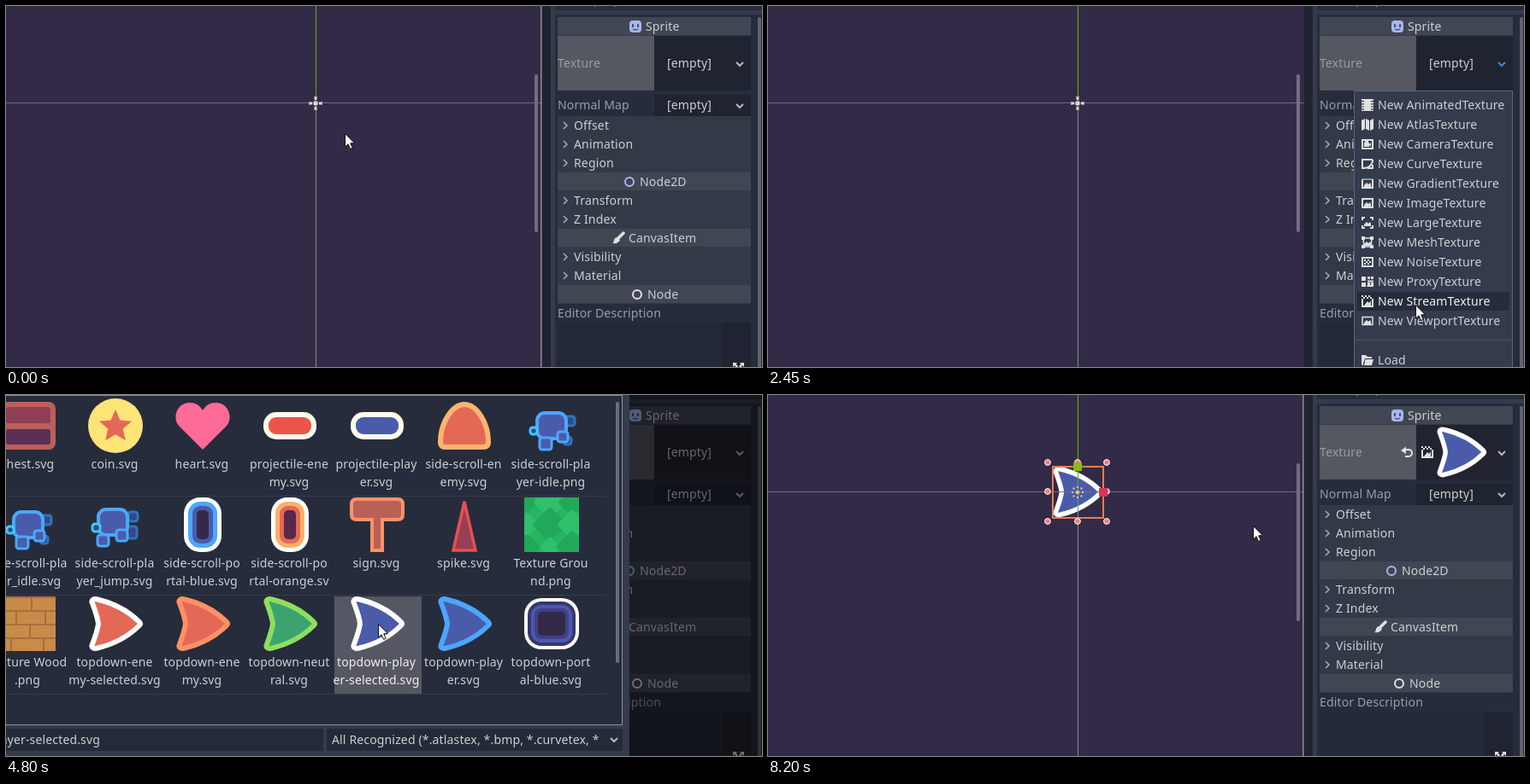
Recreate the animation shown at these times as an HTML page. Size 884x423 px, loop 8500 ms.

```html
<!DOCTYPE html>
<html>
<head>
<meta charset="utf-8">
<title>Assigning a sprite texture</title>
<style>
html, body { margin: 0; width: 100%; height: 100%; overflow: hidden; background: #332a47; }
svg { display: block; }
text { font: 14px "Noto Sans", sans-serif; letter-spacing: .15px; white-space: pre; }
</style>
</head>
<body>
<svg id="stage" width="884" height="423" viewBox="0 0 884 423"></svg>
<script>
const LOOP = 8500;
const C = {
  base: '#333b4d', dark: '#262c3b', darker: '#202430', head: '#414653', sub: '#333947',
  text: '#cdcfd2', dim: '#9a9da6', icon: '#e0e0e0', blue: '#4a5baa', sky: '#4ca6ff', red: '#e36956'
};

const rect = (x, y, w, h, fill, more = '') =>
  `<rect x="${x}" y="${y}" width="${w}" height="${h}" fill="${fill}" ${more}/>`;
const label = (x, cy, str, fill = C.text, more = '') =>
  `<text x="${x}" y="${cy + 5}" fill="${fill}" ${more}>${str}</text>`;
const fillPath = (d, fill, more = '') => `<path d="${d}" fill="${fill}" ${more}/>`;
const line = (d, stroke, w = 1, more = '') =>
  `<path d="${d}" fill="none" stroke="${stroke}" stroke-width="${w}" ${more}/>`;
const ring = (x, y, r, stroke, w = 2) =>
  `<circle cx="${x}" cy="${y}" r="${r}" fill="none" stroke="${stroke}" stroke-width="${w}"/>`;
const group = (x, y, body, s = 1) => `<g transform="translate(${x} ${y}) scale(${s})">${body}</g>`;
const layer = (id, body) => `<g id="${id}">${body}</g>`;
const chevron = (x, y, id = '') => line(`M${x - 4} ${y - 2}l4 4l4-4`, '#b5b8be', 2, id && `id="${id}"`);

const SHIP = 'M5 8C3 4 7 2 11 3.5C30 8 48 18 60 30Q62 32 60 34C48 46 30 56 11 60.5' +
  'C7 62 3 60 5 56C8 48 11 40 12 32C11 24 8 16 5 8Z';
const ship = (fill, stroke) =>
  fillPath(SHIP, fill, `stroke="${stroke}" stroke-width="6" stroke-linejoin="round"`);
const whiteShip = ship(C.blue, '#fff');

// 16 px menu icons
const frame = line('M2 3H14V13H2Z', C.icon, 2);
const hill = fillPath('M4 12V10L7 7L9 9L11 7L12 9V12Z', C.icon);
const dots = (list, s = 2) => list.map(([x, y]) => rect(x, y, s, s, C.icon)).join('');
const streamIcon = dots([[1, 1], [5, 1], [9, 1], [3, 3], [7, 3], [1, 5], [13, 5], [11, 3]]) +
  line('M14 6V14H2V7', C.icon, 2) + fillPath('M4 13L8 8L10 10L12 7V13Z', C.icon);
const ICONS = [
  rect(4, 1, 8, 14, C.icon) + line('M2.5 1V15M13.5 1V15', C.icon, 3, 'stroke-dasharray="2 1.2"'),
  fillPath('M1 3L5 1V13L1 15ZM6 1L10 3V15L6 13ZM11 3L15 1V13L11 15Z', C.icon),
  frame + rect(4, 6, 6, 5, C.icon) + fillPath('M10 8L12 6V11L10 9ZM5 4H9V6H5Z', C.icon),
  line('M14 3H2V13H4M14 3V6', C.icon, 2) + line('M3 13Q12 13 14 5M8 13H14V9', C.icon, 2),
  line('M2 3H14', '#8d9099', 2) + line('M2 3V13H14V3', C.icon, 2) + hill,
  frame + hill,
  line('M2 5V2H5M11 2H14V5M14 11V14H11M5 14H2V11', C.icon, 2) + hill,
  line('M3 3H13L12 13H4Z', C.icon, 1.6) + dots([[1, 1], [11, 1], [1, 11], [11, 11]], 4) + hill,
  frame + dots([[4, 5], [8, 5], [6, 7], [10, 7], [4, 9], [8, 9]]),
  dots([[1, 2], [1, 9]], 5) + dots([[8, 2], [12, 2], [8, 9], [12, 9]], 3) + line('M8 7.5H15M7.5 13H15', C.icon, 2),
  streamIcon,
  line('M2 3.5H14V12.5H2Z', C.icon, 1.5, 'stroke-linejoin="round"') + hill,
];
const folder = fillPath('M1 2H6L8 4H13V6H5L3 12V14H2L1 13ZM5.500 7H15L13 14H4Z', C.icon);

// ---- 2D viewport ----
function viewport() {
  const spots = [[327, 79], [362, 79], [396, 79], [327, 113], [396, 113], [327, 148], [362, 148], [396, 148]];
  const handles = spots.map(([x, y]) =>
    `<circle cx="${x}" cy="${y}" r="3.400" fill="#f37b78" stroke="#fff" stroke-width="1"/>`).join('');
  const pivot = [0, 90, 180, 270].map(a =>
    `<g transform="rotate(${a})">${rect(4, -1.500, 3, 3, '#e3d6d2')}${rect(7, -2, 1, 4, '#b9a9a9')}</g>`).join('') +
    '<circle r="3" fill="#e3d6d2" stroke="#7d7080"/>';
  const smallPivot = [0, 90, 180, 270].map(a =>
    `<g transform="rotate(${a})">${rect(5, -1, 2, 2, '#e3cfa0')}${rect(3.500, 3.500, 2, 2, '#e3cfa0')}</g>`).join('') +
    '<circle r="2.500" fill="#e3cfa0" stroke="#7d7080"/>';
  return rect(0, 0, 627, 423, '#332a47') +
    layer('sprite', group(332.2, 83.8, whiteShip, .93)) +
    rect(0, 113, 627, 1, '#726a82') +
    rect(362, 0, 1, 113, '#74ac10') + rect(362, 113, 1, 310, '#71997a') +
    layer('cross', group(362, 114, pivot)) +
    layer('selection', line('M333 84H392V144H333Z', '#e57e4e', 2) + group(362, 114, smallPivot) + handles) +
    layer('gizmo', rect(357, 79, 10, 10, '#80c00e', 'rx="1"') + rect(387, 109, 10, 10, '#dd3355', 'rx="1"')) +
    rect(618, 80, 4, 185, '#736c83', 'rx="2"') +
    rect(627, 0, 10, 423, C.darker) + rect(625, 0, 1.500, 423, '#878c9b', 'id="focus"');
}

// ---- inspector dock ----
function inspector() {
  const header = (cy, x, name, icon) => rect(645, cy - 11, 226, 21.500, C.head) + icon + label(x, cy, name);
  const fold = (cy, name) => rect(645, cy - 11, 226, 22, C.sub) +
    line(`M652 ${cy - 4}l4 4l-4 4`, '#a5a8af', 1.600) + label(664, cy, name);
  const face = rect(729, 17, 14, 14, '#a5b7f3', 'rx="4"') + rect(732, 21, 2, 4, C.head, 'rx="1"') +
    rect(738, 21, 2, 4, C.head, 'rx="1"') + line('M733 27Q736 29 739 27', C.head, 1.300);
  const brush = line('M716 272L722 266', C.icon, 3.500, 'stroke-linecap="round"') +
    fillPath('M715 271L718 274Q716 279 709 278Q711 277 711 274Q712 271 715 271Z', C.icon);
  return rect(637, 0, 247, 423, C.base) + rect(642, 0, 242, 5, C.dark) + label(649, -8, 'Filter properties', C.dim) +
    rect(642, 10, 242, 413, C.dark) +
    header(24, 748, 'Sprite', face) +
    rect(645, 35, 113, 64, '#555761') + rect(758, 35, 113, 64, C.darker) + label(645, 67, 'Texture', C.dim) +
    layer('empty', label(773, 67, '[empty]', C.text, 'id="emptyText"')) + chevron(858, 68, 'id' && 'arrow') +
    layer('filled', line('M744 64H749A4 4 0 0 1 749 72H745', C.icon, 2) + fillPath('M740 65L746 60.500V69Z', C.icon) +
      group(763, 59, streamIcon) + group(781.2, 37.5, whiteShip, .92)) +
    layer('button', line('M845.500 35.500H870.500V98.500H845.500Z', '#5b8ed8')) +
    label(645, 116, 'Normal Map', C.dim) + rect(758, 104, 113, 25, C.darker) + label(773, 116, '[empty]') + chevron(858, 117) +
    fold(140, 'Offset') + fold(162, 'Animation') + fold(184, 'Region') +
    header(206, 741, 'Node2D', ring(729, 206, 5, '#a5b7f3')) +
    fold(228, 'Transform') + fold(250, 'Z Index') +
    header(272, 728, 'CanvasItem', brush) +
    fold(294, 'Visibility') + fold(316, 'Material') +
    header(338, 750, 'Node', ring(738, 338, 5, C.icon)) +
    label(645, 360, 'Editor Description', C.dim) +
    rect(645, 371, 193, 52, '#242938') + rect(838, 371, 33, 52, C.darker) +
    fillPath('M850 418H855L853.500 419.500L856 422L854 424L852 421L850 423ZM863 418H858L859.500 419.500L857 422L859 424L861 421L863 423Z', C.icon) +
    rect(879, 13, 4, 420, '#5f6472', 'rx="2"');
}

// ---- resource menu ----
const KINDS = ['Animated', 'Atlas', 'Camera', 'Curve', 'Gradient', 'Image', 'Large', 'Mesh', 'Noise', 'Proxy', 'Stream', 'Viewport'];
const rowY = i => 116 + 23 * i;

function menu() {
  const items = KINDS.map((k, i) =>
    group(693, rowY(i) - 8, ICONS[i]) + label(713, rowY(i), `New ${k}Texture`, C.text, `class="item" data-row="${i}"`)).join('');
  return rect(685.5, 99.5, 185, 330, C.base, 'stroke="#5a6478"') +
    rect(689, 0, 178, 22, C.dark, 'id="hover"') + items +
    rect(686, 391, 184, 1, '#4d5567') + group(693, 407, folder) +
    label(713, 415, 'Load', C.text, 'class="item" data-row="13"');
}

// ---- file dialog ----
const block = (x, y, w, h, r, fill, stroke, sw = 4) =>
  rect(x, y, w, h, fill, `rx="${r}" stroke="${stroke}" stroke-width="${sw}"`);
const limb = (x, y, s, c = C.sky) => block(x, y, s, s, 3, c === C.sky ? C.blue : '#34488a', c, 3);

function star(cx, cy, r) {
  let d = '';
  for (let i = 0; i < 10; i++) {
    const a = Math.PI * (i / 5 - .5), q = i % 2 ? r * .46 : r;
    d += `${i ? 'L' : 'M'}${(cx + q * Math.cos(a)).toFixed(1)} ${(cy + q * Math.sin(a)).toFixed(1)}`;
  }
  return fillPath(d + 'Z', C.red);
}
const nested = (w, h, r, step, colors) => colors.map((c, i) => {
  const k = i * step;
  return rect(32 - w / 2 + k, 32 - h / 2 + k, w - 2 * k, h - 2 * k, c, `rx="${Math.max(r - k, 5)}"`);
}).join('');
const capsule = fill => rect(1, 16, 62, 32, '#fffbe9', 'rx="15"') + rect(7, 22, 50, 20, fill, 'rx="9"');
const hero = limb(48, 21, 11, '#2f74b8') + limb(46, 45, 9, '#2f74b8') +
  block(15, 17, 34, 30, 9, C.blue, C.sky) + limb(7, 34, 8, '#3fc8ff') + limb(18, 46, 14) + limb(39, 39, 12);
const jumper = limb(47, 17, 11, '#2f74b8') + limb(43, 34, 14, '#2f74b8') +
  block(12, 14, 34, 30, 9, C.blue, C.sky) + limb(5, 31, 9, '#3fc8ff') + limb(11, 44, 13) + limb(33, 38, 13);

function ground() {
  let s = rect(0, 0, 64, 64, '#27b562');
  for (let i = 0; i < 9; i++) {
    const x = (i % 3) * 26 + 4, y = Math.floor(i / 3) * 26 + 6, r = 9 + (i * 5) % 7;
    s += rect(x - r, y - r, 2 * r, 2 * r, i % 2 ? '#2fc06c' : '#22a85a', `rx="3" transform="rotate(45 ${x} ${y})"`);
  }
  return `<svg width="64" height="64">${s}</svg>`;
}
const wood = rect(0, 0, 64, 64, '#c88b4a') +
  line('M0 1H64M0 17H64M0 33H64M0 49H64M36 1V17M18 17V33M52 17V33M34 33V49M12 49V64M50 49V64', '#a86f3a', 2);
const chest = rect(0, 4, 64, 56, '#bb6059', 'rx="8"') + rect(6, 10, 52, 20, '#8e3f56', 'rx="4"') +
  rect(6, 36, 52, 18, '#5c2f57', 'rx="3"') + rect(0, 29, 64, 5, '#bb6059');
const blob = fillPath('M4 51C4 28 18 7 32 7S60 28 60 51Q60 57 54 57H10Q4 57 4 51Z', C.red, 'stroke="#ffb570" stroke-width="6"');
const heart = fillPath('M32 60L4 32C-4 22 2 5 17 5Q27 5 32 14Q37 5 47 5C62 5 68 22 60 32Z', '#ff6b97');
const sign = fillPath('M8 2H56Q62 2 62 8V20Q62 26 56 26H38V62H26V26H8Q2 26 2 20V8Q2 2 8 2Z', '#ba6156', 'stroke="#ff9166" stroke-width="4"');
const spike = fillPath('M32 5L45 62H19Z', '#963f55', 'stroke="#e84f50" stroke-width="3.500"');
const coin = '<circle cx="32" cy="32" r="32" fill="#ffe478"/>' + star(32, 33, 20);

const FILES = [
  [[chest, 'chest.svg'], [coin, 'coin.svg'], [heart, 'heart.svg'], [capsule('#ec544b'), 'projectile-ene', 'my.svg'],
    [capsule(C.blue), 'projectile-play', 'er.svg'], [blob, 'side-scroll-en', 'emy.svg'], [hero, 'side-scroll-pla', 'yer-idle.png']],
  [[hero, 'side-scroll-pla', 'yer_idle.svg'], [jumper, 'side-scroll-pla', 'yer_jump.svg'],
    [nested(44, 64, 19, 5, ['#fff', C.sky, C.blue, '#332a48']), 'side-scroll-po', 'rtal-blue.svg'],
    [nested(44, 64, 19, 5, ['#fff', '#ffb06a', C.red, '#57294b']), 'side-scroll-po', 'rtal-orange.sv'],
    [sign, 'sign.svg'], [spike, 'spike.svg'], [ground(), 'Texture Grou', 'nd.png']],
  [[wood, 'Texture Wood', '.png'], [ship(C.red, '#fff'), 'topdown-ene', 'my-selected.svg'],
    [ship(C.red, '#ff9166'), 'topdown-ene', 'my.svg'], [ship('#3ca370', '#8fde5d'), 'topdown-neut', 'ral.svg'],
    [whiteShip, 'topdown-play', 'er-selected.svg'], [ship(C.blue, C.sky), 'topdown-play', 'er.svg'],
    [nested(64, 60, 20, 4, ['#fff', '#39366e', C.blue, '#453f86', '#332a48']), 'topdown-port', 'al-blue.svg']],
];

function dialog() {
  let s = rect(728, 0, 156, 423, '#000', 'opacity=".5"') + rect(0, 0, 729, 423, C.base) +
    rect(-2, .5, 722.5, 386, C.dark, 'stroke="#8b909b"') +
    rect(713, 8, 4, 306, '#686d7b', 'rx="2"') + rect(384, 236, 102, 115, '#555863');
  for (const y of [118, 234, 350]) s += rect(0, y, 701, 1, '#353b4a');
  FILES.forEach((row, r) => row.forEach(([icon, ...names], c) => {
    const x = 26 + 102 * c, y = 4 + 116 * r;
    s += group(x - 32, y, icon);
    names.forEach((n, i) => {
      s += label(x - 1, y + 77 + 21 * i, n, r === 2 && c === 4 ? '#f0f0f0' : C.text, 'text-anchor="middle"');
    });
  }));
  return s + rect(0, 391, 371, 26, '#252a38') + label(110, 404, 'topdown-player-selected.svg', C.text, 'text-anchor="end"') +
    rect(375, 391, 346, 26, '#252a38') + label(381, 404, 'All Recognized (*.atlastex, *.bmp, *.curvetex, *') + chevron(711, 404);
}

const cursor = fillPath('M.5 .5V16L4 12.800L6.600 18.500L9.200 17.300L6.700 11.800H11.500Z', '#fff', 'stroke="#111" stroke-width="1"');

document.getElementById('stage').innerHTML =
  viewport() + inspector() + layer('menu', menu()) + layer('dialog', dialog()) + layer('cursor', cursor);

// ---- motion ----
const linear = p => p;
const smooth = p => p * p * (3 - 2 * p);
const out = p => 1 - (1 - p) ** 2;
const START = [396, 149];
// first step, last step, number of steps, end point, easing
const MOVES = [
  [200, 1050, 18, 797, 74, smooth],
  [1100, 1200, 3, 851, 69, out],
  [1450, 1450, 1, 859, 71, linear],
  [1850, 2000, 4, 800, 186, linear],
  [2050, 2050, 1, 795, 204, linear],
  [2100, 2450, 8, 757, 350, out],
  [2550, 2750, 3, 737, 399, linear],
  [2950, 3050, 2, 733, 408, linear],
  [4000, 4450, 6, 452, 279, smooth],
  [4600, 4800, 3, 435, 268, linear],
  [6200, 6850, 14, 567, 153, smooth],
];

function tip(t) {
  let [x, y] = START;
  for (const [a, b, n, ex, ey, ease] of MOVES) {
    if (t < a) break;
    const gap = n > 1 ? (b - a) / (n - 1) : 1;
    const p = ease(Math.min(1, (Math.floor((t - a) / gap + 1e-6) + 1) / n));
    x += (ex - x) * p;
    y += (ey - y) * p;
  }
  return [Math.round(x), Math.round(y)];
}

const el = id => document.getElementById(id);
const items = document.querySelectorAll('.item');
const show = (id, on) => el(id).setAttribute('display', on ? 'inline' : 'none');

function draw(t) {
  const [x, y] = tip(t);
  const menuOpen = t >= 1600 && t < 3500, done = t >= 5350;
  el('cursor').setAttribute('transform', `translate(${x} ${y})`);
  show('menu', menuOpen);
  show('dialog', t >= 3500 && !done);
  for (const id of ['sprite', 'selection', 'filled']) show(id, done);
  show('cross', !done);
  show('empty', !done);
  show('button', done && t < 6200);
  show('focus', t < 1600 || t >= 6200);
  show('gizmo', t >= 8200);
  const over = t < 1600 && x > 758 && x < 845 && y > 35 && y < 99;
  el('emptyText').setAttribute('fill', over ? '#eeeeee' : C.text);
  el('arrow').setAttribute('stroke', menuOpen ? '#4a83cc' : '#b5b8be');

  // the highlighted row trails the pointer by one step
  const row = Math.floor((tip(t - 50)[1] - 104.5) / 23);
  const lit = menuOpen && row >= 0 && row !== 12;
  show('hover', lit);
  el('hover').setAttribute('y', rowY(row) - 11);
  items.forEach(i => i.setAttribute('fill', lit && +i.dataset.row === row ? '#f0f0f0' : C.text));
}

const begin = performance.now();
function tick() {
  draw((performance.now() - begin) % LOOP);
  requestAnimationFrame(tick);
}
tick();
</script>
</body>
</html>
```
